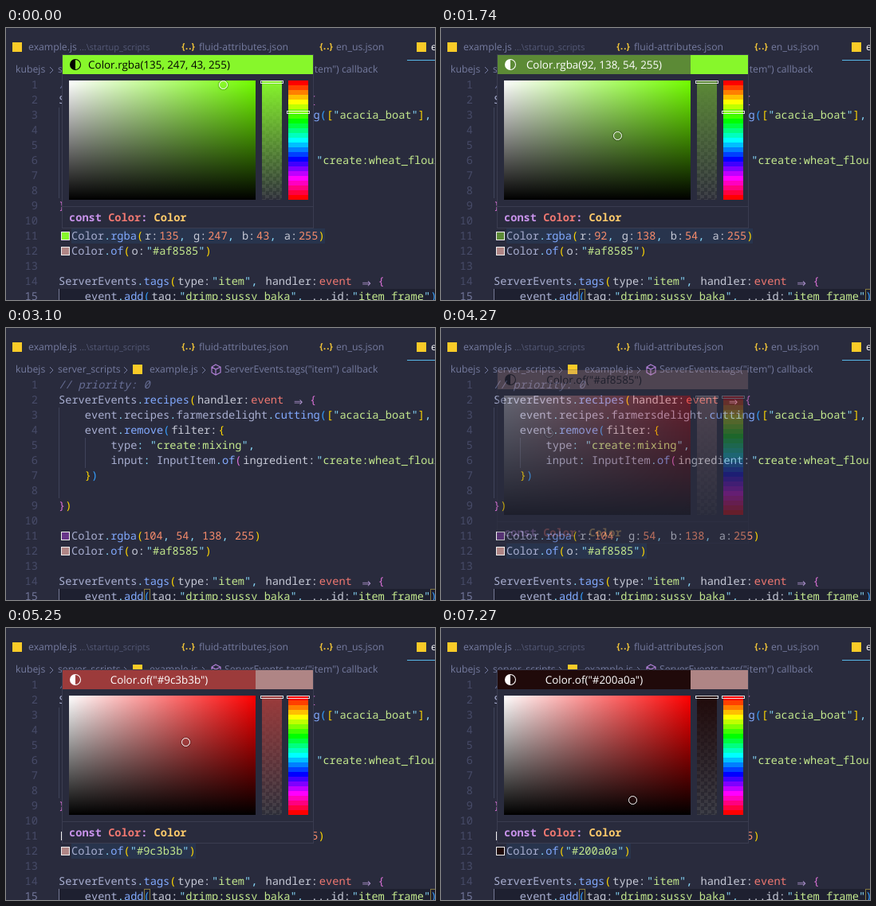
Write an HTML page that moves like this. It is 538 px wide and 342 px high and loops after 8000 ms.

```html
<!DOCTYPE html>
<html lang="en">
<head>
<meta charset="utf-8">
<title>Editor colour picker</title>
<style>
  html, body { margin: 0; width: 100%; height: 100%; overflow: hidden; background: #292b3d; }
  #stage {
    position: relative; width: 538px; height: 342px; overflow: hidden; background: #292b3d;
    text-rendering: geometricPrecision;
  }
  #stage div, #stage svg { position: absolute; box-sizing: border-box; }
  .ui { font: 12.25px/18px "Open Sans", "Noto Sans", sans-serif; color: #757b9f; white-space: pre; }
  .dim { font-size: 11px; color: #545976; }
  .braces { font: bold 11px/18px "Noto Sans Mono", monospace; letter-spacing: -2.4px; color: #f3c638; }
  .script { width: 12px; height: 12px; background: #f9cb28; }
  #code { left: 0; top: 0; }
  .row, .no, .doc {
    font: 500 13.67px/19px "Noto Sans Mono", "DejaVu Sans Mono", monospace;
    height: 19px; color: #a9afd1; white-space: pre;
  }
  .no { left: 0; width: 40px; text-align: right; color: #474b68; }
  .guide { width: 1px; background: #3f435a; }
  .op { color: #89ddff; } .str { color: #c3e88d; } .num { color: #f78c6c; } .fn { color: #82aaff; }
  .arg { color: #f07871; } .kw { color: #c792ea; } .type { color: #ffcb6b; }
  .note { color: #676e95; font-style: italic; }
  .hint { padding: 0 1.8px; color: #c6c9d6; }
  .arrow { display: inline-block; width: 16.4px; height: 19px; font-size: 17px; line-height: 17px; text-align: center; vertical-align: top; color: #b79ad8; }
  .b0 { color: #ffd700; } .b1 { color: #da70d6; } .b2 { color: #359fff; }
  .match .b2 { box-shadow: inset 0 0 0 1px #85793f; }
  .hover { background: rgba(38, 79, 120, .27); }
  .swatch { left: 69px; width: 11px; height: 11px; border: 1px solid #eee; }
  #popup { left: 70px; width: 316px; height: 219px; border: 1px solid #3a3c50; background: #292b3d; }
  #before { left: 0; top: 0; width: 314px; height: 24px; }
  #picked { left: 0; top: 0; width: 242px; height: 24px; text-align: center; font: 13.4px/24px "Open Sans", "Noto Sans", sans-serif; }
  #mode { left: 9px; top: 5px; }
  #shade { left: 8px; top: 32px; width: 234px; height: 150px; }
  #alpha, #hues { top: 32px; width: 25px; height: 150px; }
  #alpha { left: 250px; }
  #hues { left: 283px; }
  .slider { left: -2px; top: 0; width: 29px; height: 4px; border: 1px solid rgba(255, 255, 255, .85); box-shadow: 0 0 1px rgba(0, 0, 0, .85); }
  #ring { width: 11px; height: 11px; margin: -5px; border: 1px solid #fff; border-radius: 50%; box-shadow: 0 0 2px rgba(0, 0, 0, .8); }
  #rule { left: 0; top: 190px; width: 314px; height: 1px; background: #3a3c50; }
  .doc { left: 8px; top: 195px; font-weight: 600; }
</style>
</head>
<body>
<div id="stage">
  <div class="script" style="left:8px;top:18px"></div>
  <div class="ui" style="left:28px;top:15px">example.js</div>
  <div class="ui dim" style="left:92px;top:16px">...\startup_scripts</div>
  <div class="braces" style="left:219px;top:15px">{..}</div>
  <div class="ui" style="left:242px;top:15px">fluid-attributes.json</div>
  <div class="braces" style="left:392px;top:15px">{..}</div>
  <div class="ui" style="left:414px;top:15px">en_us.json</div>
  <div class="script" style="left:515px;top:18px"></div>
  <div class="ui" style="left:533px;top:15px;color:#fff">example.js</div>
  <div style="left:503px;top:40px;width:35px;height:1px;background:#58b8e8"></div>

  <div class="ui" style="left:12px;top:43px">kubejs</div>
  <div class="ui" style="left:65px;top:43px">server_scripts</div>
  <div class="script" style="left:159px;top:46px"></div>
  <div class="ui" style="left:180px;top:43px">example.js</div>
  <div class="ui" style="left:274px;top:43px">ServerEvents.tags("item") callback</div>
  <svg width="538" height="64" fill="none" stroke="#757b9f" style="left:0;top:0">
    <path d="M55 49l4 4-4 4M148 49l4 4-4 4M246 49l4 4-4 4"/>
    <path stroke="#b180d7" stroke-width="1.2" d="M263 46l6 3v7l-6 3-5-3v-7zM258 49l5 3 6-3M263 52v7"/>
  </svg>

  <div style="left:66px;top:328px;width:472px;height:19px;background:#1e2030"></div>
  <div id="code"></div>

  <div id="popup">
    <div id="before"></div>
    <div id="picked">
      <span id="label"></span>
      <svg id="mode" width="14" height="14" viewBox="1 1 14 14" fill="currentColor">
        <path d="M8 1a7 7 0 1 0 0 14A7 7 0 0 0 8 1zm0 13V2a6 6 0 1 1 0 12z"/>
      </svg>
    </div>
    <div id="shade"><div id="ring"></div></div>
    <div id="alpha"><div class="slider"></div></div>
    <div id="hues"><div class="slider" id="hue"></div></div>
    <div id="rule"></div>
    <div class="doc"><span class="kw">const</span> <span class="arg">Color</span><span class="kw">:</span> <span class="type">Color</span></div>
  </div>
</div>

<script>
const LOOP = 8000;
const $ = id => document.getElementById(id);
const code = $('code');

function add(className, style, html = '') {
  const el = document.createElement('div');
  el.className = className;
  Object.assign(el.style, style);
  el.innerHTML = html;
  code.append(el);
  return el;
}

// Inlay hints are written between backticks.
const TOKEN = /(\/\/.*)|`([^`]+)`|"([^"]*)"|(=>)|(\d+)|(\w+)|([([{])|([)\]}])|([.,:])/g;
let depth = 0;
const span = (cls, text) => `<span class="${cls}">${text}</span>`;

function highlight(text) {
  return text.replace(TOKEN, (all, note, hint, str, arrow, num, word, open, close, op, at) => {
    if (note) return span('note', note);
    if (hint) return span('hint', hint);
    if (str) return span('op', '"') + span('str', str) + span('op', '"');
    if (arrow) return span('arrow', '⇒');
    if (num) return span('num', num);
    if (open) return span('b' + depth++ % 3, open);
    if (close) return span('b' + --depth % 3, close);
    if (op) return span('op', op);
    const rest = text.slice(at + word.length);
    if (rest[0] === '(') return span('fn', word);
    return rest.startsWith(' =>') ? span('arg', word) : word;
  });
}

const rowTop = n => 62 + 19 * (n - 1);
const px = n => n + 'px';

const source = [
  '// priority: 0',
  'ServerEvents.recipes(`handler:`event => {',
  '    event.recipes.farmersdelight.cutting(["acacia_boat"], ',
  '    event.remove(`filter:`{',
  '        type: "create:mixing",',
  '        input: InputItem.of(`ingredient:`"create:wheat_flour")',
  '    })',
  '',
  '})',
  '', '', '', '',
  'ServerEvents.tags(`type:`"item", `handler:`event => {',
  '    event.add(`tag:`"drimp:sussy_baka", `...id:`"item_frame")'
];

function guide(x, from, to) {
  return add('guide', { left: px(x), top: px(rowTop(from)), height: px(19 * (to - from + 1)) });
}
guide(66, 3, 8);
guide(99, 5, 6);
guide(66, 15, 15).style.background = '#757a96';

source.forEach((text, i) => {
  const n = i + 1;
  add('no', { top: px(rowTop(n)), color: n === 15 ? '#717699' : '' }, n);
  const html = highlight(text);
  // The call on line 3 is closed beyond the right edge.
  if (n === 3) depth--;
  add('row', { left: '66px', top: px(rowTop(n)) }, html);
});
const activeRow = code.lastChild;

const makeColorRow = n => ({
  text: add('row', { left: '82px', top: px(rowTop(n)) }),
  swatch: add('swatch', { top: px(rowTop(n) + 4) })
});
const rgbaRow = makeColorRow(11);
const hexRow = makeColorRow(12);

const GREEN = [135, 247, 43], MOSS = [92, 138, 54], PURPLE = [104, 54, 138];
const ROSE = [175, 133, 133], BRICK = [156, 59, 59], RED = [226, 32, 32], DARK = [32, 10, 10];

const css = c => `rgb(${c})`;
const hex = c => '#' + c.map(v => v.toString(16).padStart(2, '0')).join('');
const rgbaText = (c, hints) =>
  `Color.rgba(${[...c, 255].map((v, i) => (hints ? '`' + 'rgba'[i] + ':`' : '') + v).join(', ')})`;
const hexText = (c, hints) => `Color.of(${hints ? '`o:`' : ''}"${hex(c)}")`;

// Each entry holds from its time until the next one.
const tracks = {
  picked: [[0, GREEN], [500, MOSS], [2020, PURPLE], [4270, ROSE], [5100, BRICK], [6180, RED], [7110, DARK]],
  opacity: [[0, 1], [3100, 0], [4270, .28], [4330, .68], [4390, 1]],
  rgbaCode: [
    [0, rgbaText(GREEN, true)], [560, rgbaText(MOSS)], [1740, rgbaText(MOSS, true)],
    [2080, rgbaText(PURPLE)], [3370, rgbaText(PURPLE, true)]
  ],
  rgbaSwatch: [[0, GREEN], [1490, MOSS], [3100, PURPLE]],
  hexCode: [[0, hexText(ROSE, true)], [5180, hexText(BRICK)], [6240, hexText(RED)], [7190, hexText(DARK)]],
  hexSwatch: [[0, ROSE], [6300, RED], [7270, DARK]],
  matched: [[0, false], [560, true], [3160, false], [5180, true]]
};
const at = (name, t) => tracks[name].findLast(([start]) => start <= t)[1];

function toHsv([r, g, b]) {
  const max = Math.max(r, g, b), range = max - Math.min(r, g, b);
  const h = max === r ? (g - b) / range : max === g ? 2 + (b - r) / range : 4 + (r - g) / range;
  return { h: (h * 60 + 360) % 360, s: range / max, v: max / 255 };
}

const BANDS = 25;
$('hues').style.background = `linear-gradient(${Array.from({ length: BANDS }, (_, i) =>
  `hsl(${360 * i / (BANDS - 1)} 100% 50%) ${100 * i / BANDS}% ${100 * (i + 1) / BANDS}%`)})`;

function showPicker(color, onHexRow) {
  const { h, s, v } = toHsv(color);
  const luma = (.299 * color[0] + .587 * color[1] + .114 * color[2]) / 255;
  $('popup').style.top = px(onHexRow ? 52 : 33);
  $('before').style.background = css(onHexRow ? ROSE : GREEN);
  $('picked').style.background = css(color);
  $('picked').style.color = luma > .5 ? '#000' : '#fff';
  $('label').textContent = onHexRow ? hexText(color) : rgbaText(color);
  $('shade').style.background =
    `linear-gradient(to top, #000, transparent), linear-gradient(to right, #fff, rgba(255,255,255,0)), hsl(${h} 100% 50%)`;
  $('ring').style.left = px(Math.round(s * 234));
  $('ring').style.top = px(Math.round((1 - v) * 150));
  $('hue').style.top = px(Math.round(h / 360 * 146));
  $('alpha').style.background =
    `linear-gradient(${css(color)}, rgba(${color},0)), repeating-conic-gradient(#3d3e47 0 25%, #2d2e39 0 50%) 0 0 / 9px 9px`;
}

function showRow(row, text, swatch, hovered) {
  depth = 0;
  row.text.innerHTML = highlight(text);
  row.text.classList.toggle('hover', hovered);
  row.swatch.style.background = css(swatch);
}

let shown = '';
function draw(now) {
  const t = now % LOOP;
  const state = Object.keys(tracks).map(name => at(name, t));
  const key = JSON.stringify(state);
  if (key !== shown) {
    shown = key;
    const [picked, opacity, rgbaCode, rgbaSwatch, hexCode, hexSwatch, matched] = state;
    const onHexRow = t >= 4270;
    $('popup').style.opacity = opacity;
    showPicker(picked, onHexRow);
    showRow(rgbaRow, rgbaCode, rgbaSwatch, opacity > 0 && !onHexRow);
    showRow(hexRow, hexCode, hexSwatch, opacity > 0 && onHexRow);
    activeRow.classList.toggle('match', matched);
  }
  requestAnimationFrame(draw);
}
draw(performance.now());
</script>
</body>
</html>
```
